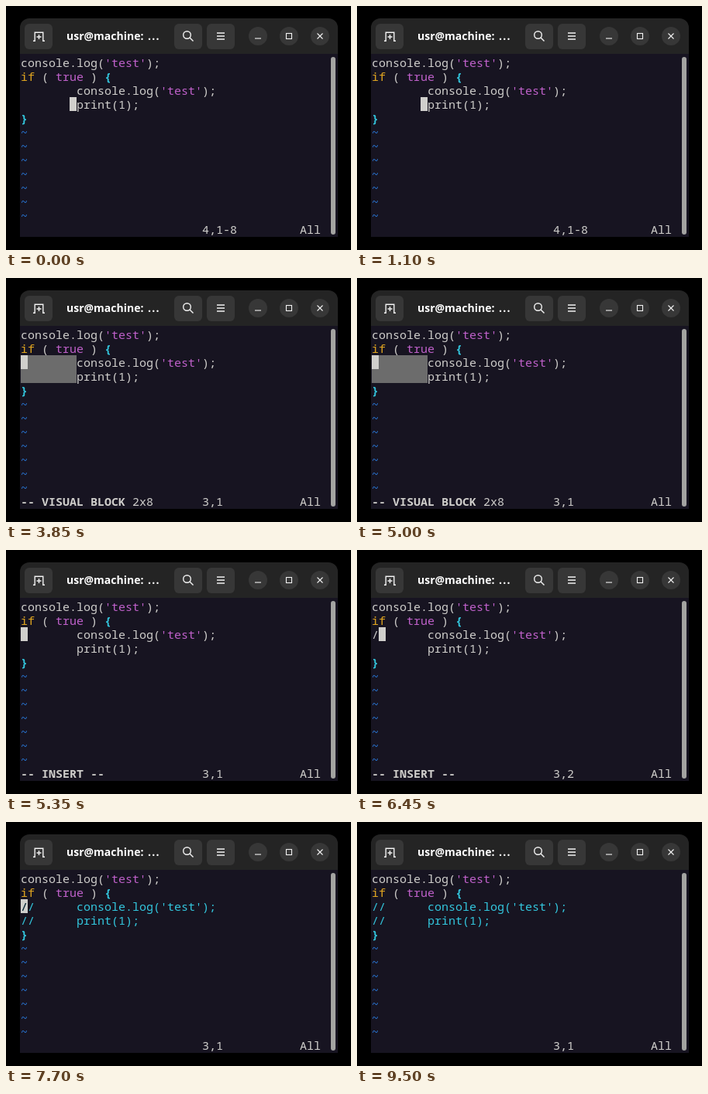
Recreate the animation shown at these times as an HTML page. Size 445 by 316 pixels, loop 9950 ms.

```html
<!DOCTYPE html>
<html lang="en">
<head>
<meta charset="utf-8">
<title>Block comment in a terminal editor</title>
<style>
  html, body { margin: 0; width: 100%; height: 100%; overflow: hidden; background: #000; }
  svg { display: block; width: 445px; height: 316px; }
  #screen text { font: 15px "Noto Sans Mono", "DejaVu Sans Mono", monospace; white-space: pre; }
  #screen .bold { font-weight: 700; }
  .title { font: 700 14px "Open Sans", "Noto Sans", sans-serif; fill: #fff; }
  .button { fill: #373737; }
  .icon { fill: none; stroke: #f2f2f2; stroke-width: 1.4; }
</style>
</head>
<body>
<svg viewBox="0 0 445 316">
  <path d="M18 63V28a12 12 0 0 1 12-12H416a12 12 0 0 1 12 12V63z" fill="#242424"/>
  <rect x="18" y="62" width="410" height="237" fill="#171421"/>

  <g class="button">
    <rect x="24" y="23" width="36" height="33" rx="6"/>
    <rect x="217" y="23" width="36" height="33" rx="6"/>
    <rect x="259" y="23" width="36" height="33" rx="6"/>
    <circle cx="325" cy="39" r="12"/>
    <circle cx="365" cy="39" r="12"/>
    <circle cx="405" cy="39" r="12"/>
  </g>
  <g class="icon">
    <path d="M35 45.3H37.2V34.2H47.8V45.3H50M42.5 37V43M39.5 40H45.5"/>
    <circle cx="233.5" cy="37.5" r="4.8"/>
    <path d="M237 41L241.5 45.5"/>
    <path d="M272 35H282M272 39H282M272 43H282"/>
    <path d="M321 42H329" stroke-width="1.1"/>
    <rect x="361.5" y="35.5" width="7" height="7" stroke-width="1.1"/>
    <path d="M401.5 35.5L408.5 42.5M408.5 35.5L401.5 42.5" stroke-width="1.1"/>
  </g>
  <text class="title" x="78" y="44">usr@machine:</text>
  <text class="title" x="183" y="44" letter-spacing="1.2">...</text>

  <g id="screen"></g>
  <rect x="419" y="66" width="6" height="230" rx="3" fill="#a3a3a1"/>
</svg>

<script>
const LOOP = 9950;
const LEFT = 19, TOP = 64, CELL_W = 9, CELL_H = 18;
const COLORS = {
  back: '#171421', text: '#d0cfcc', keyword: '#e0a520', value: '#c061cb',
  cyan: '#33c7de', blue: '#2a7bde', selection: '#6c6c6c'
};

// Editor states; rows and columns count from zero.
const STATES = [
  { at: 0, cursor: [3, 7], pos: '4,1-8' },
  { at: 1850, cursor: [3, 7], pos: '4,1-8', mode: '-- VISUAL BLOCK', size: '1x8', selected: [3] },
  { at: 2700, cursor: [2, 0], pos: '3,1', mode: '-- VISUAL BLOCK', size: '2x8', selected: [2, 3] },
  { at: 5350, cursor: [2, 0], pos: '3,1', mode: '-- INSERT --' },
  { at: 6450, cursor: [2, 1], pos: '3,2', mode: '-- INSERT --', prefix: ['/', ''] },
  { at: 6650, cursor: [2, 2], pos: '3,3', mode: '-- INSERT --', prefix: ['//', ''] },
  { at: 7650, cursor: [2, 0], pos: '3,1', prefix: ['//', '//'], under: '/' }
];

// The cursor starts visible and toggles at each of these times.
const BLINKS = [500, 1100, 2400, 2650, 3250, 3850, 4450, 5000,
                5950, 6400, 7200, 7550, 8300, 8900, 9500];

const put = (row, col, string, color = 'text', bold = false) =>
  `<text x="${LEFT + col * CELL_W}" y="${TOP + row * CELL_H + 15}" fill="${COLORS[color]}"` +
  `${bold ? ' class="bold"' : ''}>${string}</text>`;

const fillCells = (row, col, count, color) =>
  `<rect x="${LEFT + col * CELL_W}" y="${TOP + row * CELL_H}" width="${count * CELL_W}"` +
  ` height="${CELL_H}" fill="${COLORS[color]}"/>`;

function logCall(row, col, commented) {
  if (commented) return put(row, col, "console.log('test');", 'cyan');
  return put(row, col, 'console.log(') + put(row, col + 12, "'test'", 'value') + put(row, col + 18, ');');
}

function render(state, cursorOn) {
  const [row, col] = state.cursor;
  const prefix = state.prefix || ['', ''];
  const commented = prefix.map(p => p === '//');
  const prefixColor = i => commented[i] ? 'cyan' : 'text';
  let out = '';

  for (const r of state.selected || []) out += fillCells(r, 0, 8, 'selection');
  if (cursorOn || state.selected) out += fillCells(row, col, 1, cursorOn ? 'text' : 'back');

  out += logCall(0, 0, false);
  out += put(1, 0, 'if', 'keyword') + put(1, 3, '(') + put(1, 5, 'true', 'value') +
         put(1, 10, ')') + put(1, 12, '{', 'cyan', true);
  out += put(2, 0, prefix[0], prefixColor(0)) + logCall(2, 8, commented[0]);
  out += put(3, 0, prefix[1], prefixColor(1)) + put(3, 8, 'print(1);', prefixColor(1));
  out += put(4, 0, '}', 'cyan', true);
  for (let r = 5; r < 12; r++) out += put(r, 0, '~', 'blue');

  if (cursorOn && state.under) out += put(row, col, state.under, 'back');

  out += put(12, 0, state.mode || '', 'text', true) + put(12, 16, state.size || '') +
         put(12, 26, state.pos) + put(12, 40, 'All');
  return out;
}

const screen = document.getElementById('screen');
const start = performance.now();
let shown = '';

function tick() {
  const t = (performance.now() - start) % LOOP;
  const state = STATES.filter(s => s.at <= t).pop();
  const cursorOn = BLINKS.filter(b => b <= t).length % 2 === 0;
  const key = state.at + ':' + cursorOn;
  if (key !== shown) {
    screen.innerHTML = render(state, cursorOn);
    shown = key;
  }
  requestAnimationFrame(tick);
}
tick();
</script>
</body>
</html>
```
